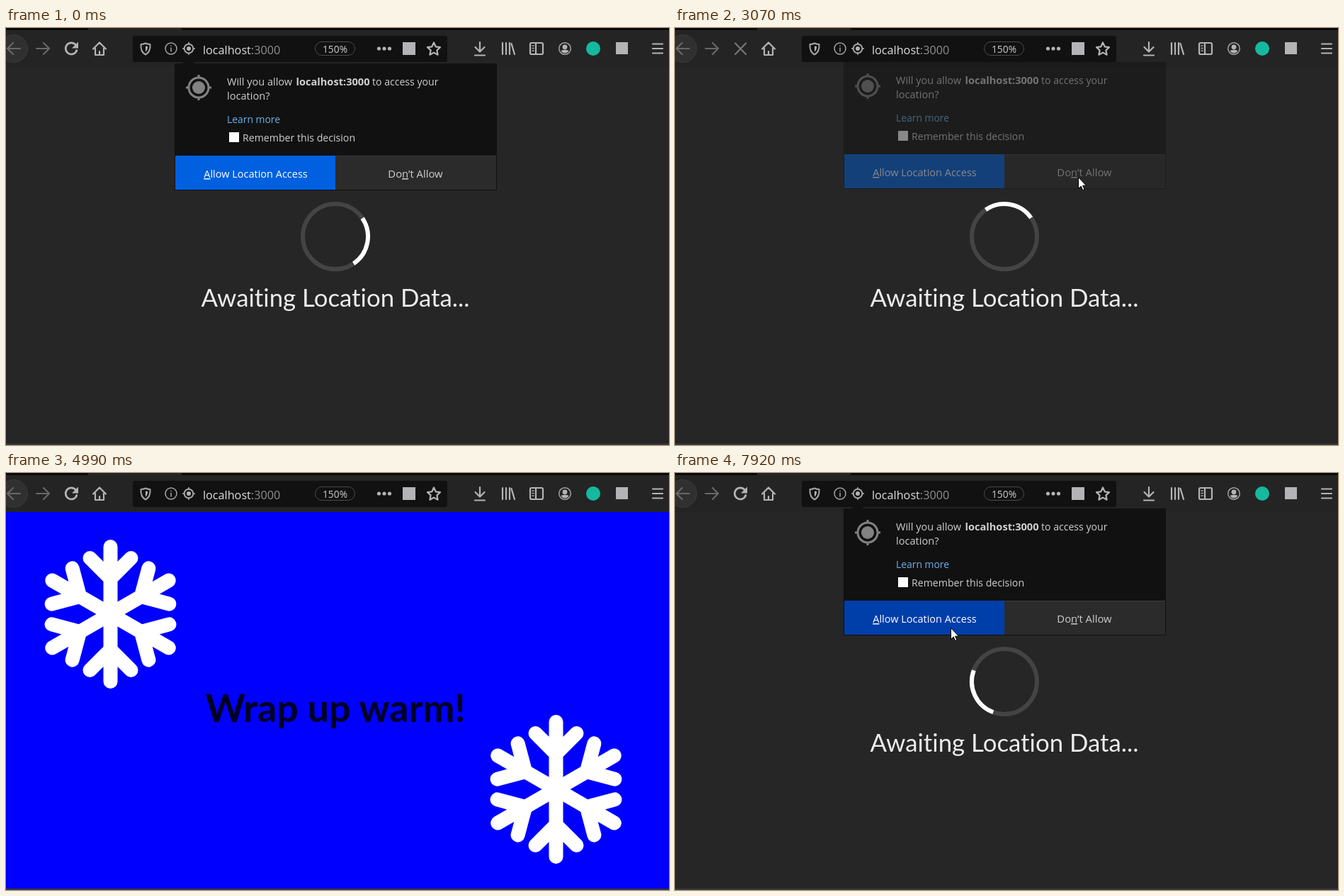
Recreate the animation shown at these times as an HTML page. Size 936 px wide and 588 px high, loop 8 s.

```html
<!DOCTYPE html>
<html lang="en">
<head>
<meta charset="utf-8">
<title>Location prompt</title>
<style>
  html, body { margin: 0; width: 100%; height: 100%; overflow: hidden; background: #262626; }
  svg { display: block; width: 936px; height: 588px; }
  text { font-family: "Open Sans", "Noto Sans", sans-serif; fill: #cfcfcf; white-space: pre; font-variant-ligatures: none; }
  .lato { font-family: Lato, sans-serif; text-anchor: middle; }
  .head { font-size: 53.7px; font-weight: 700; fill: #000; fill-opacity: .87; }
  .icon { fill: none; stroke: #b4b4b6; stroke-width: 2.2; stroke-linecap: round; stroke-linejoin: round; }
  .solid { fill: #b4b4b6; stroke: none; }
  .faint { stroke: #68686a; }
  .small { stroke: #a4a4a6; stroke-width: 2; }
  .thin { stroke: #a4a4a6; stroke-width: 1.5; }
  .bold { stroke-width: 2.7; }
  .u { text-decoration: underline; }
</style>
</head>
<body>
<svg viewBox="0 0 936 588">
  <defs>
    <path id="branch" d="M0 0V-95M-29-79L0-50L29-79" fill="none" stroke="#fff" stroke-width="20"
      stroke-linecap="round" stroke-linejoin="round"/>
    <g id="flake"></g>
  </defs>

  <!-- pages -->
  <g id="wait">
    <rect y="55" width="936" height="533" fill="#262626"/>
    <circle cx="465" cy="294" r="46" fill="none" stroke="#444" stroke-width="6"/>
    <path id="arc" d="M432.47 261.47A46 46 0 0 1 497.53 261.47" fill="none" stroke="#fff" stroke-width="6"/>
    <text class="lato" x="465" y="393" font-size="34.8" style="fill:#ececec">Awaiting Location Data...</text>
  </g>
  <g id="denied">
    <rect y="55" width="936" height="533" fill="#fff"/>
    <text class="lato head" x="738" y="109" style="text-anchor:end">User denied geolocation prompt</text>
  </g>
  <g id="cold">
    <rect y="55" width="936" height="533" fill="#00f"/>
    <use href="#flake" x="147.5" y="199"/>
    <use href="#flake" x="776.5" y="446"/>
    <text class="lato head" x="465" y="351">Wrap up warm!</text>
  </g>
  <rect y="586" width="936" height="2" fill="#38383b"/>

  <!-- toolbar -->
  <rect width="936" height="55" fill="#242424"/>
  <path d="M0 0H116V3H0ZM248 0H936V3H248Z" fill="#09090b"/>
  <ellipse id="burst" cx="140" cy="-8" rx="14" ry="12" fill="#5c1522"/>
  <rect x="179" y="11" width="444" height="37" rx="3" fill="#111"/>
  <circle cx="11" cy="29" r="19.5" fill="#303030" stroke="#3a3a3a"/>
  <path class="icon faint" d="M2 29H20M10 21L2 29L10 37M43 29H61M53 21L61 29L53 37"/>
  <g id="reload">
    <path class="icon bold" d="M98.5 24A8 8 0 1 0 99.8 31.5"/>
    <path class="solid" d="M102 19.5V28.5H93Z"/>
  </g>
  <path id="stop" class="icon" d="M85 21.5L100 37M100 21.5L85 37" style="stroke:#77777a"/>
  <path class="icon" d="M123 29.5L132 20.5L141 29.5M126 28.5V38H138V28.5M132 38V33"/>
  <path class="icon small" d="M197 21.5C199 22.5 201 23 203.5 23C204 30 202 35 197 37.5C192 35 190 30 190.5 23C193 23 195 22.5 197 21.5Z"/>
  <path class="solid" d="M197 25.5L200 26C200 29.5 199 32 197 33.5Z"/>
  <circle class="icon thin" cx="233" cy="29" r="8"/>
  <path class="icon thin" d="M233 28V33M233 25V25.2"/>
  <g id="pin">
    <circle class="icon small" cx="258" cy="29" r="6.3"/>
    <path class="icon small" d="M258 21V22M258 36V37M250 29H251M265 29H266"/>
    <circle class="solid" cx="258" cy="29" r="3"/>
    <g id="slash">
      <path d="M252 38.5L268 22" stroke="#111" stroke-width="3"/>
      <path class="icon small" d="M250 37L266 20.5"/>
    </g>
  </g>
  <text id="url" y="36.5" font-size="16.2" style="fill:#ddd">localhost<tspan fill="#8f8f91">:3000</tspan></text>
  <rect x="436.5" y="19.5" width="56" height="19" rx="9.5" fill="none" stroke="#4a4a4c"/>
  <text x="464.5" y="35" font-size="13.8" text-anchor="middle">150%</text>
  <g class="solid">
    <circle cx="526.5" cy="29" r="2.6"/>
    <circle cx="534" cy="29" r="2.6"/>
    <circle cx="541.5" cy="29" r="2.6"/>
    <rect x="560" y="20" width="18" height="18"/>
    <rect x="861" y="20" width="17" height="17"/>
  </g>
  <path id="star" class="icon"/>
  <path class="icon" d="M669 20V33M662.5 27L669 33.5L675.5 27M662 38.5H676"/>
  <path class="icon" d="M701 21V37M706 21V37M711 21V37M713.5 22L718 37"/>
  <rect class="icon" x="740" y="21" width="18" height="16" rx="2"/>
  <path class="icon" d="M748 21V37"/>
  <path class="icon thin" d="M743 25H745M743 28.5H745M743 32H745"/>
  <circle class="icon thin" cx="789" cy="29" r="8.3"/>
  <circle class="solid" cx="789" cy="26.8" r="3.4"/>
  <path class="solid" d="M783.5 32Q789 29.500 794.500 32Q792.500 35.500 789 35.500Q785.500 35.500 783.500 32Z"/>
  <circle cx="829" cy="29" r="10" fill="#15b9a0"/>
  <path class="icon" d="M913 22.5H927M913 29H927M913 35.5H927"/>

  <!-- permission panel -->
  <g id="panel">
    <path d="M248 51L258 43L268 51Z" fill="#111"/>
    <rect x="238" y="50" width="455" height="179" fill="#111"/>
    <g fill="none" stroke="#828282" stroke-width="3">
      <circle cx="272" cy="84" r="14"/>
      <path d="M272 66V70M272 98V102M254 84H258M286 84H290"/>
    </g>
    <circle cx="272" cy="84" r="9" fill="#828282"/>
    <text x="312" y="81" font-size="14.5">Will you allow</text>
    <text x="409.5" y="81" font-size="14.6" font-weight="700">localhost:3000</text>
    <text x="517" y="81" font-size="14.1">to access your</text>
    <text x="312" y="101" font-size="14.6">location?</text>
    <text x="312" y="134" font-size="13.9" style="fill:#6cb2ea">Learn more</text>
    <rect x="315" y="147" width="14" height="14" fill="#fff"/>
    <text x="334" y="160" font-size="14.15">Remember this decision</text>
    <rect id="allow" x="239" y="180" width="226" height="48"/>
    <rect id="deny" x="465" y="180" width="227" height="48"/>
    <path d="M465 180.5H692" stroke="#3c3c3c"/>
    <text x="352.5" y="211" font-size="14.5" text-anchor="middle" style="fill:#fff"><tspan class="u">A</tspan>llow Location Access</text>
    <text x="578" y="211" font-size="14.8" text-anchor="middle">Do<tspan class="u">n</tspan>’t Allow</text>
  </g>

  <path id="cursor" d="M.5 .5V16.5L4.2 13L6.7 18.6L9 17.6L6.6 12.2H11.5Z" fill="#fff" stroke="#000"/>
</svg>
<script>
const $ = id => document.getElementById(id);
const LOOP = 8000, STEP = 76.6, TURN = 47;

// Each scene runs from one page load; all figures after `start` count in steps.
const scenes = [
  { start: 0, angle: 101, open: -9, close: 24, from: 0, until: 25, end: 'denied',
    path: [[4, 640, 357], [6, 600, 270], [8, 562, 200], [9, 557, 178], [11, 552, 192],
           [22, 552, 196], [23, 565, 206], [24, 569, 210]] },
  { start: 2840, angle: 229, open: 2, close: 17, from: 1, until: 25, before: 'denied', end: 'cold',
    stop: 7, dim: 13, pin: 2,
    path: [[0, 569, 210], [4, 569, 210], [8, 700, 226], [11, 740, 230], [14, 480, 215], [16, 393, 197]] },
  { start: 6080, angle: 197, open: 12, close: 99, from: 1, until: 99, before: 'cold',
    stop: 3, dim: 12, pin: 12,
    path: [[2, 450, 560], [3, 425, 400], [4, 408, 293], [20, 408, 293], [21, 400, 265],
           [22, 393, 226], [23, 390, 219], [24, 389, 218]] }
];

function show(id, on) { $(id).style.display = on ? '' : 'none'; }

function along(path, k) {
  if (k < path[0][0]) return null;
  const i = path.findIndex(p => p[0] > k);
  if (i < 0) return path[path.length - 1].slice(1);
  const [a, b] = [path[i - 1], path[i]], f = (k - a[0]) / (b[0] - a[0]);
  return [1, 2].map(j => Math.round(a[j] + (b[j] - a[j]) * f));
}

function panelOpacity(s, k) {
  if (k < s.open) return 0;
  if (k >= s.close) return [.6, .2][k - s.close] || 0;
  return [.15, .45, .85][k - s.open] || 1;
}

function render(t) {
  const s = scenes.findLast(x => t >= x.start);
  const k = Math.floor((t - s.start + 8) / STEP);
  const page = k < s.from ? s.before : k < s.until ? 'wait' : s.end;
  for (const id of ['wait', 'denied', 'cold']) show(id, page === id);
  $('arc').setAttribute('transform', `rotate(${(s.angle + k * TURN) % 360} 465 294)`);

  const { stop = 0, dim = 0, pin = 0 } = s;
  show('stop', k < stop);
  show('reload', k >= stop);
  $('reload').style.opacity = k < dim ? .5 : 1;
  show('burst', stop && k >= stop && k < stop + 3);
  show('pin', k >= pin);
  show('slash', s.end === 'denied' && k >= s.close);
  $('url').setAttribute('x', k >= pin ? 278 : 253);

  const alpha = panelOpacity(s, k);
  show('panel', alpha);
  $('panel').style.opacity = alpha;
  $('panel').setAttribute('transform', `translate(0 ${Math.round(-7 * (1 - alpha) ** 2)})`);

  const at = page === 'cold' ? null : along(s.path, k);
  show('cursor', at);
  const [x, y] = at || [0, 0];
  $('cursor').setAttribute('transform', `translate(${x} ${y})`);
  const inRow = alpha === 1 && y >= 180 && y < 228;
  $('allow').setAttribute('fill', inRow && x >= 239 && x < 465 ? '#003eaa' : '#0060df');
  $('deny').setAttribute('fill', inRow && x >= 465 && x < 692 ? '#3d3d3d' : '#2b2b2b');
}

$('flake').innerHTML = [0, 1, 2, 3, 4, 5]
  .map(i => `<use href="#branch" transform="rotate(${i * 60})"/>`).join('');

$('star').setAttribute('d', 'M' + Array.from({ length: 10 }, (_, i) => {
  const r = i % 2 ? 4.6 : 9.5, a = i * Math.PI / 5;
  return (604 + r * Math.sin(a)).toFixed(1) + ' ' + (30 - r * Math.cos(a)).toFixed(1);
}).join('L') + 'Z');

const begin = performance.now();
function tick() {
  render((performance.now() - begin) % LOOP);
  requestAnimationFrame(tick);
}
tick();
</script>
</body>
</html>
```
